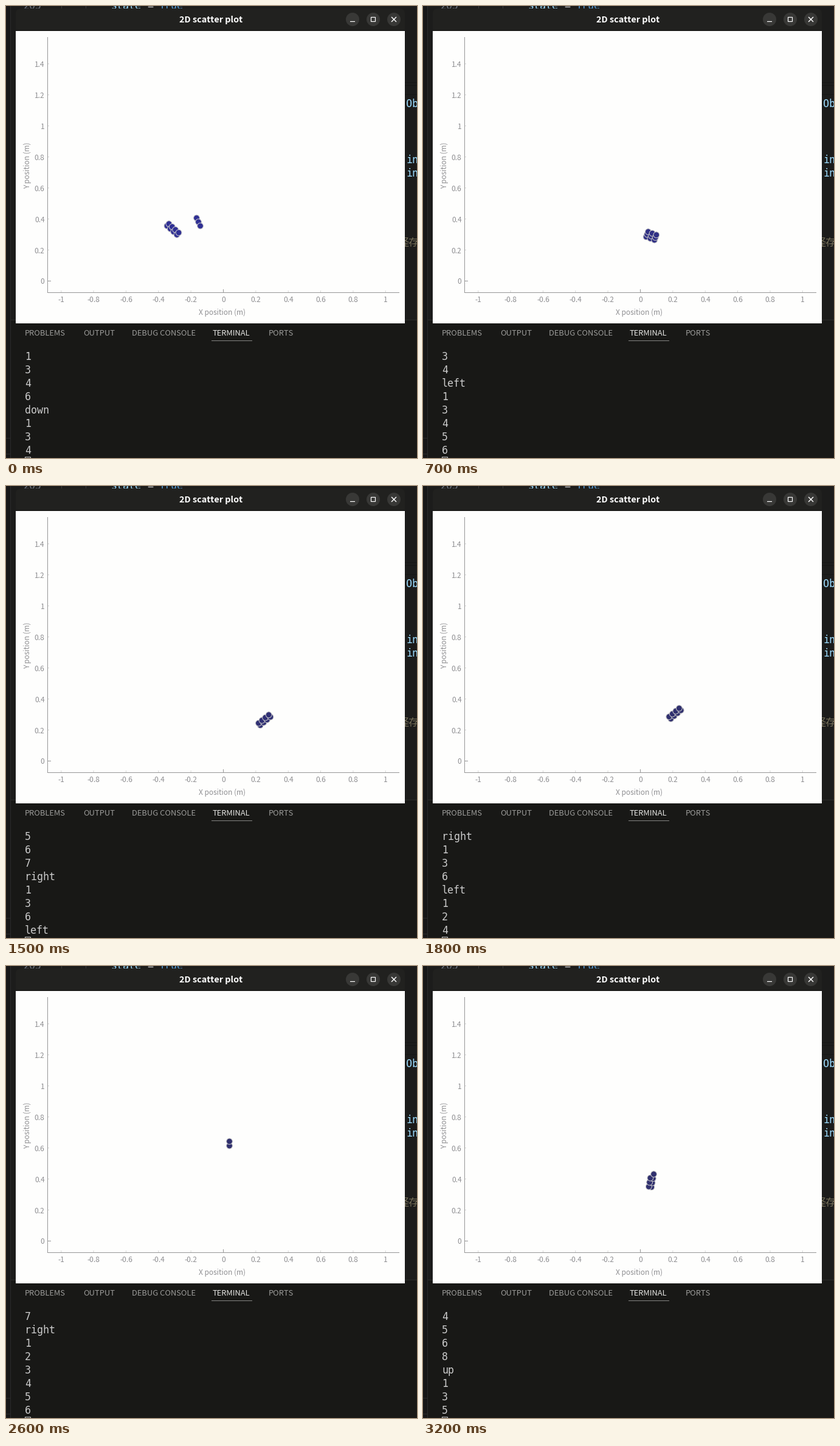
A matplotlib script that plays this animation: 676 by 742 pixels, repeating every 3300 ms.

```python
import numpy as np
import matplotlib.pyplot as plt
from matplotlib.animation import FuncAnimation
from matplotlib.patches import Circle, FancyBboxPatch, Rectangle

W, H, DPI = 676, 742, 100
FRAMES, STEP = 33, 100
PT = 72 / DPI
SANS, MONO = "Noto Sans CJK JP", "DejaVu Sans Mono"
GRAY, FAINT, TEXT = "#969696", "#d4d4d4", "#8f8f92"
CODE = 16.6

fig = plt.figure(figsize=(W / DPI, H / DPI), dpi=DPI, facecolor="#1c1c1b")
ax = fig.add_axes([0, 0, 1, 1])
ax.set_xlim(0, W)
ax.set_ylim(H, 0)
ax.axis("off")


def rect(x0, y0, x1, y1, color, z=1):
    ax.add_patch(Rectangle((x0, y0), x1 - x0, y1 - y0, fc=color, lw=0, zorder=z))


def line(xs, ys, color, width=1, z=4):
    ax.plot(xs, ys, color=color, lw=width * PT, zorder=z,
            solid_capstyle="butt", snap=False)


def label(x, y, s, px, color, font=SANS, z=5, **kw):
    return ax.text(x, y, s, fontsize=px * PT, color=color, family=font,
                   va="baseline", zorder=z, **kw)


def draw_editor():
    rect(0, 0, 7, H, "#171717")
    rect(7, 515, W, H, "#181816")
    line([7.5, 7.5], [0, H], "#2b2b2b", z=1)
    line([7, W], [515.5, 515.5], "#2b2b2a", z=1)
    for y in (709.5, 735.5):
        line([0, 7], [y, y], "#2b2b2b", z=1)
    for x in (91.5, 131.5):
        line([x, x], [0, 5], "#3a3a3a", z=1)
    label(29, 5, "205", CODE, "#6e7681", MONO, 1)
    label(172, 5, "state", CODE, "#9cdcfe", MONO, 1)
    label(232, 5, "=", CODE, "#cccccc", MONO, 1)
    label(252, 5, "True", CODE, "#569cd6", MONO, 1)
    for y in (125.5, 130.5, 145.5):
        line([656, W], [y, y], "#161615", z=1)
    for y, s in ((166, "Ob"), (258, "in"), (280, "in")):
        label(658, y, s, CODE, "#9cdcfe", MONO, 2)
    label(646, 394, "径存", 17, "#746e58", z=2)


def draw_window():
    ax.add_patch(FancyBboxPatch((16, 4), 640, 60, fc="#21211f", lw=0, zorder=3,
                                boxstyle="round,pad=0,rounding_size=9"))
    rect(16, 40, 656, 41, "#10100f", 3.5)
    rect(16, 41, 656, 521, "#fefefd", 3.5)
    label(337, 27, "2D scatter plot", 14.4, "white", weight="bold", ha="center")
    for x in (570, 604, 638):
        ax.add_patch(Circle((x, 22), 11, fc="#383836", lw=0, zorder=4))
    line([566, 574], [25.5, 25.5], "white", 1.2, 5)
    ax.add_patch(Rectangle((600.5, 18.5), 7, 7, fill=False, ec="white",
                           lw=1.2 * PT, zorder=5, snap=False))
    for ya, yb in ((18, 26), (26, 18)):
        line([634, 642], [ya, yb], "white", 1.4, 5)


def draw_axes():
    for i in range(-5, 6):
        x = 357.5 + 53.35 * i
        line([x, x], [467 if i else 465, 470], FAINT if i else GRAY)
        label(x, 486, f"{i / 5:g}", 12, TEXT, ha="center")
    for i in range(8):
        y = 451.5 - 50.95 * i
        line([69, 71 if i else 74], [y, y], FAINT if i else GRAY)
        label(63.5, y + 5, f"{i / 5:g}", 12, TEXT, ha="right")
    line([68.5, 68.5], [51, 471], GRAY)
    line([68, 647], [470.5, 470.5], GRAY)
    label(355.5, 507, "X position (m)", 12, TEXT, ha="center")
    label(39, 261.5, "Y position (m)", 12, TEXT, ha="center",
          rotation=90, rotation_mode="anchor")


def draw_tabs():
    tabs = ((31, "PROBLEMS"), (127, "OUTPUT"), (207, "DEBUG CONSOLE"),
            (340, "TERMINAL"), (432, "PORTS"))
    for x, s in tabs:
        label(x, 541, s, 12.9, "#e4e4e2" if s == "TERMINAL" else "#9b9b99")
    line([338, 405], [549.5, 549.5], "#858583")


draw_editor()
draw_window()
draw_axes()
draw_tabs()

LOG = ("1 3 4 6 down 1 3 4 left 1 3 4 5 6 7 right 1 3 6 left 1 2 4 "
       "6 7 right 1 2 3 4 5 6 8 up 1 3 5").split()

# Hand poses: frame, log lines so far, centre x, centre y, points, tilt
POSES = np.array([
    (0, 8, 274, 366, 8, 42),
    (4, 11, 327, 361, 10, 65),
    (11, 18, 439, 398, 7, -38),
    (18, 23, 414, 373, 8, -40),
    (22, 26, 366, 362, 1, -85),
    (26, 32, 367, 291, 2, -90),
    (32, 37, 375, 353, 7, -80),
])

# Brief separate echoes: frame, x, y, points, tilt
ECHOES = ((0, 316, 354, 3, 65), (4, 345, 355, 3, -80),
          (11, 409, 190, 2, -75), (11, 565, 275, 2, -40))

RADIUS, ALONG, ACROSS = 4.9, 7.2, 4.5


def cluster(x, y, n, tilt):
    """Points in up to four rows along the tilt direction, centred on x, y."""
    k = np.arange(n)
    cols = -(-n // 4)
    t = np.radians(tilt)
    grid = (np.outer(k // cols, (np.cos(t), np.sin(t))) * ALONG
            + np.outer(k % cols, (np.sin(t), -np.cos(t))) * ACROSS)
    return grid - grid.mean(axis=0) + (x + 0.5, y + 0.5)


def pose_at(i):
    return [np.interp(i, POSES[:, 0], col) for col in POSES.T[1:]]


dots = [ax.add_patch(Circle((0, 0), RADIUS, ec="#c8c8c8", lw=PT, zorder=6))
        for _ in range(16)]
rows = [label(31, 581 + 22 * k, "", CODE, "#cccccc", MONO) for k in range(8)]
ax.add_patch(Rectangle((31.5, 740.5), 9, 18, fill=False, ec="#cccccc",
                       lw=PT, zorder=5, snap=False))


def update(i):
    lines, x, y, n, tilt = pose_at(i)
    groups = [cluster(x, y, round(n), tilt)]
    groups += [cluster(*echo) for f, *echo in ECHOES if abs(i - f) <= 1]
    pts = np.vstack(groups)
    fill = (0.19, 0.19, 0.58 - 0.15 * min(i / 18, 1))
    for k, dot in enumerate(dots):
        dot.set_visible(k < len(pts))
        dot.set_facecolor(fill)
        if k < len(pts):
            dot.set_center(pts[k])
    end = int(lines + 1e-6)
    for row, s in zip(rows, LOG[end - 8:end]):
        row.set_text(s)
    return [*dots, *rows]


anim = FuncAnimation(fig, update, frames=FRAMES, interval=STEP,
                     repeat=True, repeat_delay=0, blit=False)
plt.show()
```
